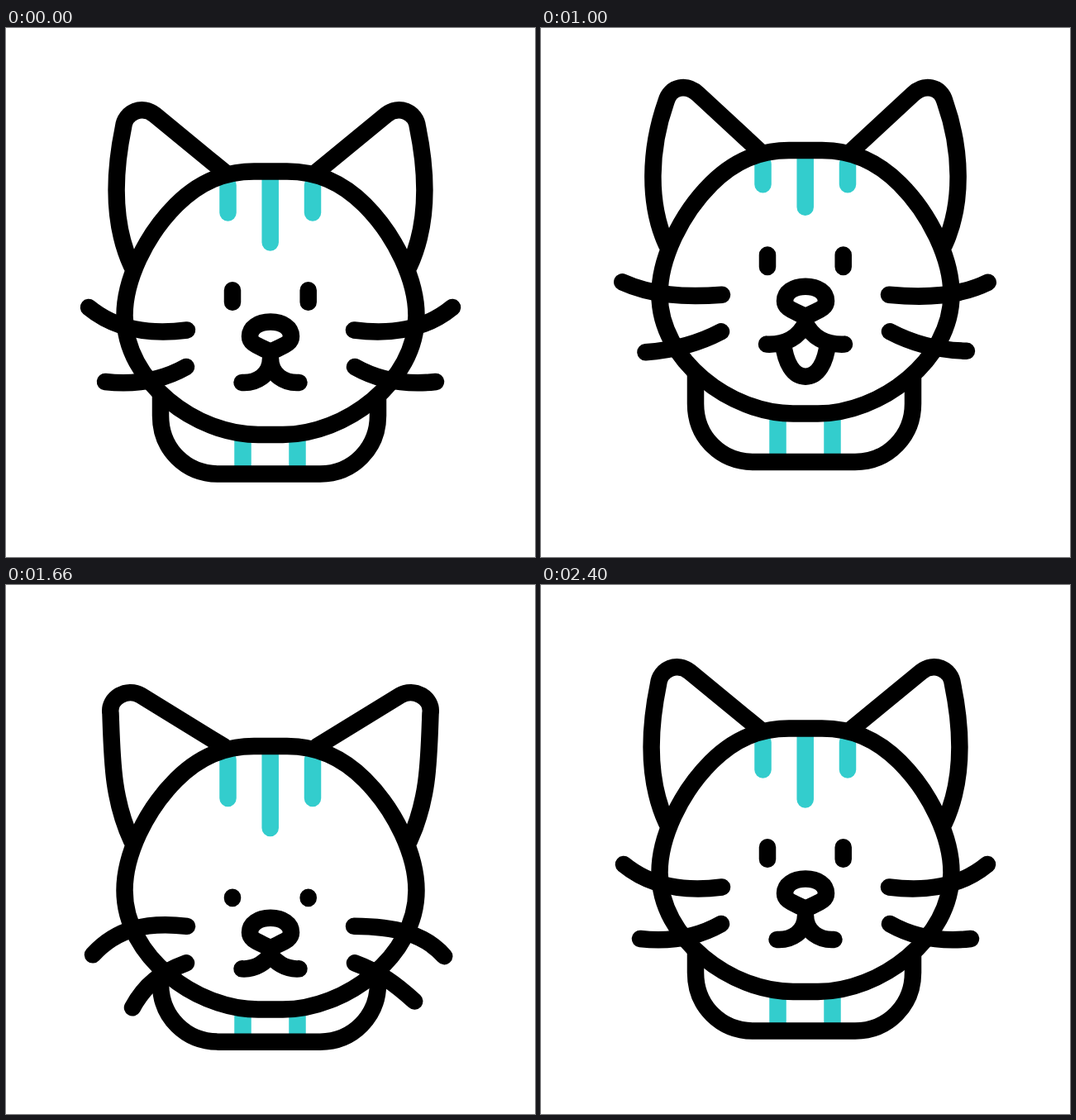
Recreate the animation shown at these times as an HTML page. Size 640x640 px, loop 2600 ms.

```html
<!DOCTYPE html>
<html lang="en">
<head>
<meta charset="utf-8">
<title>Cat</title>
<style>
html, body { margin: 0; width: 100%; height: 100%; overflow: hidden; background: #fff; }
svg { display: block; width: 100vw; height: 100vh; }
.line { fill: none; stroke: #000; stroke-width: 20.5; stroke-linecap: round; stroke-linejoin: round; }
.stripe { fill: none; stroke: #33cdcd; stroke-width: 20.5; stroke-linecap: round; }
.white { fill: #fff; }
</style>
</head>
<body>
<svg viewBox="0 0 640 640">
  <defs>
    <path id="skull" d="M300 173.500H340C376 173.500 406 186 434 214C472 252 496.500 306 496.500 348C496.500 428 410 492 335 492H305C230 492 143.500 428 143.500 348C143.500 306 168 252 206 214C234 186 264 173.500 300 173.500Z"/>
  </defs>
  <g id="body">
    <path class="stripe" d="M286.500 420V538M352.500 420V538"/>
    <path class="line" d="M187 400V469C187 510 218 539.500 257 539.500H380C420 539.500 450 508 450 469V400"/>
  </g>
  <g id="ears">
    <path id="earL" class="line"/>
    <path id="earR" class="line" transform="matrix(-1 0 0 1 640 0)"/>
  </g>
  <use id="skin" href="#skull" fill="#fff"/>
  <path id="stripes" class="stripe"/>
  <use id="rim" href="#skull" class="line"/>
  <g id="face">
    <path id="whiskL" class="line"/>
    <path id="whiskR" class="line" transform="matrix(-1 0 0 1 640 0)"/>
    <path id="eyes" class="line"/>
    <path id="tongue" class="line white"/>
    <path id="mouth" class="line"/>
    <path class="line white" d="M320 355.500C335 355.500 345 363 345 373C345 382 336 384 320 392C304 384 295 382 295 373C295 363 305 355.500 320 355.500Z"/>
  </g>
</svg>
<script>
const LOOP = 2600;
const $ = id => document.getElementById(id);
const path = (id, d) => $(id).setAttribute("d", d);
const shift = (id, y) => $(id).setAttribute("transform", `translate(0 ${y.toFixed(2)})`);
const clamp = u => Math.min(1, Math.max(0, u));
const smooth = u => u * u * (3 - 2 * u);

// Eased steps through [time, value] keys.
const ease = (t, keys) => keys.reduce((value, [time, next], i) => {
  if (!i) return next;
  const from = keys[i - 1][0];
  return value + (next - value) * smooth(clamp((t - from) / (time - from)));
}, 0);

// Duck, leap, duck, overshoot and settle; lag delays both ducks.
const bounce = (t, low, high, over, lag = 0) => ease(t, [
  [210, 0], [360 + lag, low], [1170, high], [1310, high],
  [1545 + lag, low], [2090, over], [2370, 0]]);

// Loose parts trail behind the bounce.
const trail = (t, low, high, over) => ease(t, [
  [210, 0], [540, low], [600, low], [1160, high], [1320, high],
  [1640, low], [1660, low], [2040, over], [2400, 0]]);

// lean: -1 spread wide, 1 upright; bow arches the inner edge.
function earPath(lean, bow) {
  const x = 180 + 17 * lean, y = 105 - 2 * lean + 5 * lean * lean;
  const ox = 142 + 15.5 * lean, oy = 120 - 11 * lean + 3 * lean * lean;
  const dx = x - 264, dy = y - 174, reach = 19 / Math.hypot(dx, dy);
  const arch = k => `${264 + dx * k + 8 * bow} ${174 + dy * k - 4 * bow}`;
  return `M264 174C${arch(1 / 3)} ${arch(2 / 3)} ${x} ${y}` +
    `C${x + dx * reach} ${y + dy * reach} ${ox + 2 + 5 * lean} ${oy - 19} ${ox} ${oy}` +
    `C${ox - 12 - 14 * lean} ${oy + 58} ${129 + 9 * bow} 238 152 288`;
}

// droop: 0 at rest, 1 hanging; the right side (side = 1) bends less.
function whiskerPath(droop, side) {
  const flat = 6 * side * Math.max(0, droop);
  return `M219 365.5C${175 - 5 * droop} ${371 - 11 * droop + flat} 134 ${366 + 2 * droop + flat} ` +
    `${100 - 12 * droop + 17 * droop * droop + 0.8 * flat} ${338 + 62 * droop + 0.3 * flat}` +
    `M218 410C188 ${427 - 6 * droop} ${156 + 12 * droop} ${432 + 4 * droop} ` +
    `${120 + 33 * droop - 1.2 * flat} ${428 + 36 * droop - 1.3 * flat}`;
}

function drawMouth(t) {
  const open = ease(t, [[720, 0], [980, 1], [1210, 1], [1480, 0]]);
  const wide = open ** 4, lift = trail(t, 12, 9, -4);
  const w = 34.5 + 12.5 * wide, y = 429 - lift + 6 * wide;
  const curl = Math.max(0, 0.42 * lift) + 4 * wide;
  path("mouth", `M${320 - w} ${y}C${320 - w / 2} ${y + 1} ${320 - curl} ${y - 9} 320 400` +
    `C${320 + curl} ${y - 9} ${320 + w / 2} ${y + 1} ${320 + w} ${y}`);

  const r = 10 + 17 * open, top = 402 + 22 * open, low = 408 + 56.5 * open;
  const bend = top + (low - top) * 0.6;
  $("tongue").style.display = open > 0.01 ? "" : "none";
  path("tongue", `M${320 - r} ${top}C${320 - r * 0.9} ${bend} ${320 - r * 0.55} ${low} 320 ${low}` +
    `C${320 + r * 0.55} ${low} ${320 + r * 0.9} ${bend} ${320 + r} ${top}`);
}

function draw(t) {
  const head = bounce(t, 26, -32, -12), face = bounce(t, 48, -57.5, -23, 90);
  shift("body", bounce(t, 15, -18.3, -1));
  ["ears", "skin", "rim"].forEach(id => shift(id, head));
  shift("face", face);

  const ear = earPath(trail(t, -1, 1, 1), ease(t, [[520, 0], [680, 1], [900, 0]]));
  path("earL", ear);
  path("earR", ear);

  const droop = trail(t, 1, 0, -0.27);
  path("whiskL", whiskerPath(droop, 0));
  path("whiskR", whiskerPath(droop, 1));

  // Stripes stretch between the skull and the face.
  const side = 223.5 + (head + face) / 2;
  const mid = side + 36 + Math.min(0, (face - head) / 2);
  path("stripes", `M268.5 ${190 + head}V${side}M319.7 ${183 + head}V${mid}M371 ${190 + head}V${side}`);

  // Lids close from above at the bottom of each duck.
  const away = Math.min(Math.abs(t - 450), Math.abs(t - 1640));
  const lid = 317.3 + 13 * smooth(clamp((190 - away) / 150));
  path("eyes", `M274 ${lid}V331.7M365.7 ${lid}V331.7`);

  drawMouth(t);
}

const start = performance.now();
function tick() {
  draw((performance.now() - start) % LOOP);
  requestAnimationFrame(tick);
}
draw(0);
requestAnimationFrame(tick);
</script>
</body>
</html>
```
